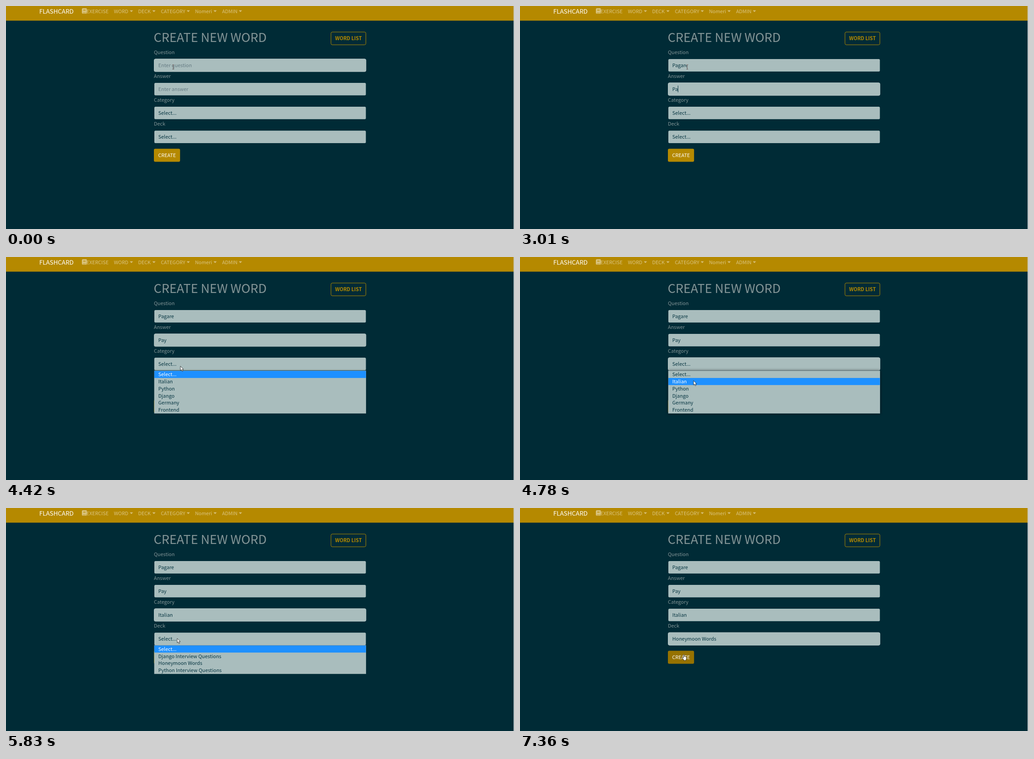
An HTML page that plays this animation: 1130 by 496 pixels, repeating every 8 s.

```html
<!DOCTYPE html>
<html lang="en">
<head>
<meta charset="utf-8">
<title>Create new word</title>
<style>
  html, body { margin: 0; width: 100%; height: 100%; overflow: hidden; background: #002b36; }
  svg { display: block; }
  text { font: 10.95px "Noto Sans CJK JP", "Noto Sans CJK SC", "Noto Sans CJK", "Noto Sans", sans-serif; white-space: pre; }
  .nav { fill: #dac480; }
  .label { fill: #839496; }
  .ink { fill: #073642; }
  .box { fill: #a9bdbd; }
  .focus { fill: #a9bdbd; stroke: #b9c8c8; }
  .shadow { filter: blur(3px); }
  #beam { mix-blend-mode: difference; }
</style>
</head>
<body>
<svg id="stage" width="1130" height="496" viewBox="0 0 1130 496"></svg>
<script>
const text = (x, y, s, attrs = '') => `<text x="${x}" y="${y}" ${attrs}>${s}</text>`;
const rect = (x, y, w, h, attrs = '') => `<rect x="${x}" y="${y}" width="${w}" height="${h}" ${attrs}/>`;
const $ = id => document.getElementById(id);

const ROW = 15.75;
const fields = [
  { id: 'question', label: 'Question', y: 118 },
  { id: 'answer', label: 'Answer', y: 171 },
  { id: 'category', label: 'Category', y: 224 },
  { id: 'deck', label: 'Deck', y: 277.2 }
];
const lists = [
  { id: 'categoryList', y: 253.3, open: 4400, close: 5400,
    items: ['Select...', 'Italian', 'Python', 'Django', 'Germany', 'Frontend'] },
  { id: 'deckList', y: 305.8, open: 5830, close: 7150,
    items: ['Select...', 'Django Interview Questions', 'Honeymoon Words', 'Python Interview Questions'] }
];
const menu = [['WORD', 240, 275.3], ['DECK', 293.9, 325.4], ['CATEGORY', 344.4, 401.8],
  ['Nomeri', 420.4, 461.5], ['ADMIN', 480.7, 517.8]];

const navBar = rect(0, 0, 1130, 32.6, 'fill="#b58900"')
  + text(73.9, 17, 'FLASHCARD', 'fill="#fff" style="font-size:13.7px"')
  + `<g class="nav">
      <path d="M171 5h7.6q1 0 1 1v7.6q0 .7-.7 1v1.3q.7 0 .7.6t-.7.6H171q-2.2 0-2.2-2.2V7.2Q168.800 5 171 5Z"/>
      <path d="M171.700 8.300h5.400M171.700 10.200h5.400M170.700 15.200h7" stroke="#b58900" stroke-width=".9"/>`
  + text(179, 16, 'EXERCISE')
  + menu.map(([s, x, c]) => text(x, 16, s) + `<path d="M${c} 9.700h7.300l-3.650 3.650z"/>`).join('')
  + '</g>';

const fieldSvg = f => text(329, f.y - 11, f.label, 'class="label"')
  + rect(330, f.y, 470.5, 27.8, 'rx="2.5" class="box"')
  + rect(329.5, f.y - .2, 471.3, 28.2, `rx="3" class="focus" id="${f.id}Focus"`)
  + text(338.8, f.y + 18.2, '', `id="${f.id}"`);

const listSvg = l => {
  const h = l.items.length * ROW;
  return `<g id="${l.id}">`
    + rect(329.5, l.y - .6, 471.5, h + 1, `class="shadow" id="${l.id}Shadow"`)
    + rect(329.5, l.y - .8, 471.5, h + 1.2, 'fill="#71868a"')
    + rect(330, l.y, 470.7, h, 'class="box"')
    + rect(330, l.y, 470.7, ROW, `fill="#1e90ff" id="${l.id}Mark"`)
    + l.items.map((s, i) => text(338.8, l.y + 12.1 + i * ROW, s, `id="${l.id}${i}"`)).join('')
    + '</g>';
};

$('stage').innerHTML = rect(0, 0, 1130, 496, 'fill="#002b36"') + navBar
  + rect(1129, 0, 1, 496, 'fill="#c9d2d4"')
  + text(328.6, 79.6, 'CREATE NEW WORD', 'class="label" style="font-size:27.4px"')
  + rect(722.9, 57.9, 77.6, 28.4, 'rx="3" fill="none" stroke="#b58900"')
  + text(732, 76.3, 'WORD LIST', 'fill="#b58900" style="font-weight:bold"')
  + fields.map(fieldSvg).join('')
  + rect(329, 317.5, 58.2, 29, 'rx="3" id="button"')
  + text(338.6, 336.2, 'CREATE', 'fill="#fff"')
  + rect(339, 124, 1, 15, 'class="ink" id="caret"')
  + lists.map(listSvg).join('')
  + `<path id="beam" d="M-2 -5h1.500l.5.5.5-.5h1.500M0 -4.500V4.500M-2 5h1.500l.5-.5.5.5h1.500" fill="none" stroke="#fff" stroke-width=".9"/>
     <path id="arrow" d="M0 0V9.800L2.200 7.800 3.800 11.500 5.600 10.700 4 7.200H7Z" fill="#fff" stroke="#000" stroke-width=".7"/>
     <path id="hand" d="M-1 1Q0-.6 1 1V5Q2 4 3 5.200 4 4.500 4.700 5.700 6 5.200 6 6.800V9.500L4.800 12V13.500H-.5V12L-3.600 8Q-3.500 6.300-2.200 7L-1 8Z" fill="#fff" stroke="#000" stroke-width=".7"/>`;

// Pointer path: time, x, y
const path = [[0, 372, 135.5], [3870, 372, 135.5], [4050, 386, 199], [4250, 388, 237], [4400, 388, 241],
  [4660, 387, 262], [4780, 386, 275], [5400, 386, 275], [5680, 380.8, 290], [5900, 380.8, 290],
  [6410, 395.6, 343], [7150, 395.6, 343], [7360, 364.5, 325.5], [8000, 364.5, 325.5]];
const questionKeys = [570, 800, 1010, 1270, 1450, 1570];
const answerKeys = [2630, 3010, 3380];

const clamp = v => Math.max(0, Math.min(1, v));
const fade = (t, start) => clamp((t - start) / 150);
const show = (id, on) => $(id).setAttribute('visibility', on ? 'visible' : 'hidden');
const typed = (t, word, keys) => word.slice(0, keys.filter(k => k <= t).length);

function setText(id, s, color) {
  const el = $(id);
  if (el.textContent !== s) el.textContent = s;
  el.setAttribute('fill', color);
}

function pointer(t) {
  const i = path.findIndex(p => p[0] > t);
  const [a, x, y] = path[i - 1], [b, x2, y2] = path[i];
  const k = (t - a) / (b - a);
  return [x + (x2 - x) * k, y + (y2 - y) * k];
}

function drawCaret(t) {
  const first = t < 2100;
  show('caret', (t >= 400 && first) || (t >= 2130 && t < 3870));
  const el = $(first ? 'question' : 'answer');
  const keys = first ? questionKeys : answerKeys;
  const length = t >= keys[0] ? el.getComputedTextLength() : .2;
  $('caret').setAttribute('x', Math.floor(338.8 + length));
  $('caret').setAttribute('y', first ? 124 : 177);
}

function drawList(l, t, y) {
  const on = t >= l.open && t < l.close;
  $(l.id).setAttribute('display', on ? 'inline' : 'none');
  if (!on) return;
  const row = Math.max(0, Math.floor((y - l.y) / ROW));
  $(l.id + 'Mark').setAttribute('y', l.y + row * ROW);
  $(l.id + 'Shadow').setAttribute('opacity', .55 * fade(t, l.open));
  l.items.forEach((s, i) => $(l.id + i).setAttribute('fill', i === row ? '#fff' : '#073642'));
}

function draw(t) {
  const [x, y] = pointer(t);
  const ink = '#073642', hint = '#657b83';
  setText('question', typed(t, 'Pagare', questionKeys) || 'Enter question', t < 570 ? hint : ink);
  setText('answer', typed(t, 'Pay', answerKeys) || 'Enter answer', t < 2630 ? hint : ink);
  setText('category', t < 5400 ? 'Select...' : 'Italian', ink);
  setText('deck', t < 7150 ? 'Select...' : 'Honeymoon Words', ink);

  const focusTimes = [-150, 2100, 4400, 5830, 9000];
  fields.forEach((f, i) => $(f.id + 'Focus').setAttribute('opacity',
    fade(t, focusTimes[i]) * (1 - fade(t, focusTimes[i + 1]))));
  drawCaret(t);
  lists.forEach(l => drawList(l, t, y));

  const hover = fade(t, 7205);
  $('button').setAttribute('fill', `rgb(${181 - 31 * hover},${137 - 23 * hover},0)`);
  const kind = y < 224 ? 'beam' : t > 7205 ? 'hand' : 'arrow';
  for (const id of ['beam', 'arrow', 'hand']) show(id, id === kind);
  $(kind).setAttribute('transform', `translate(${x} ${y})`);
}

const start = performance.now();
function tick() {
  draw((performance.now() - start) % 8000);
  requestAnimationFrame(tick);
}
tick();
</script>
</body>
</html>
```
